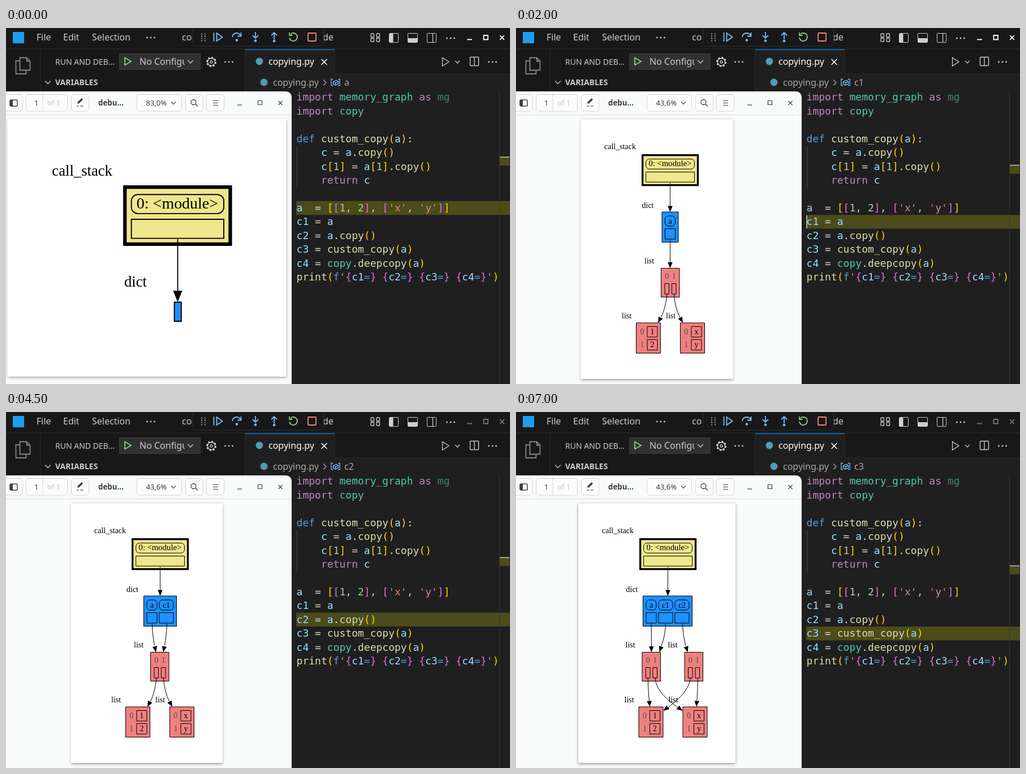
An HTML page with a canvas for the animation above (8000 ms loop, 891 by 629 pixels).

```html
<!DOCTYPE html>
<html lang="en">
<head>
<meta charset="utf-8">
<title>Stepping through list copies</title>
<style>
html, body { margin: 0; width: 100%; height: 100%; overflow: hidden; background: #1f1f1f; }
canvas { display: block; }
</style>
</head>
<body>
<canvas id="stage" width="891" height="629"></canvas>
<script>
const ctx = document.getElementById('stage').getContext('2d');
const UI = '"Noto Sans", "Open Sans", sans-serif';
const MONO = '"DejaVu Sans Mono", monospace';
const SERIF = '"Liberation Serif", "Times New Roman", serif';

// ---------- drawing helpers ----------
function rect(x, y, w, h, fill, stroke, radius = 0, width = 1) {
  ctx.beginPath();
  ctx.roundRect(x, y, w, h, radius);
  if (fill) { ctx.fillStyle = fill; ctx.fill(); }
  if (stroke) { ctx.strokeStyle = stroke; ctx.lineWidth = width; ctx.stroke(); }
}

function path(d, stroke, width = 1.3, fill) {
  const p = new Path2D(d);
  if (fill) { ctx.fillStyle = fill; ctx.fill(p); }
  if (stroke) { ctx.strokeStyle = stroke; ctx.lineWidth = width; ctx.stroke(p); }
}

function text(s, x, y, color, font, align = 'left') {
  ctx.font = font;
  ctx.fillStyle = color;
  ctx.textAlign = align;
  ctx.fillText(s, x, y);
}

function disc(x, y, r, color) {
  ctx.beginPath();
  ctx.arc(x, y, r, 0, 7);
  ctx.fillStyle = color;
  ctx.fill();
}

const dots = (x, y, color = '#ccc') => [-6.5, 0, 6.5].forEach(d => disc(x + d, y, 1.4, color));
const chevron = (x, y, color, r = 4.5) => path(`M${x - r} ${y - r / 2}l${r} ${r}l${r} ${-r}`, color);
const cross = (x, y, r, color, width) =>
  path(`M${x - r} ${y - r}l${2 * r} ${2 * r}m0 ${-2 * r}l${-2 * r} ${2 * r}`, color, width);

// ---------- editor ----------
const COLORS = {
  k: '#c586c0', d: '#569cd6', t: '#4ec9b0', m: '#3e8577', v: '#9cdcfe', f: '#dcdcaa',
  n: '#b5cea8', s: '#ce9178', w: '#d4d4d4', g: '#ffd700', o: '#da70d6'
};

// Tokens are split by "|"; the first letter of each picks its colour.
const field = name => `o{|v${name}|d=|o}`;
const CODE = [
  'kimport |tmemory_graph|k as |mmg',
  'kimport |tcopy',
  '',
  'ddef |fcustom_copy|g(|va|g)|w:',
  'w    |vc|w = |va|w.|fcopy|g()',
  'w    |vc|g[|n1|g]|w = |va|g[|n1|g]|w.|fcopy|g()',
  'w    |kreturn |vc',
  '',
  "va|w  = |g[|o[|n1|w, |n2|o]|w, |o[|s'x'|w, |s'y'|o]|g]",
  'vc1|w = |va',
  'vc2|w = |va|w.|fcopy|g()',
  'vc3|w = |fcustom_copy|g(|va|g)',
  'vc4|w = |tcopy|w.|fdeepcopy|g(|va|g)',
  `fprint|g(|df|s'|${['c1', 'c2', 'c3', 'c4'].map(field).join('|w |')}|s'|g)`
];
const LINE = 24.46, CHAR = 10.837;

function drawCode(step) {
  rect(513, 305.7 + step * LINE, 378, LINE, '#4b4b1c');
  rect(514, 208, 1, 74, '#484848');
  CODE.forEach((line, row) => {
    let col = 0;
    for (const token of line.split('|')) {
      const s = token.slice(1);
      text(s, 513.6 + col * CHAR, 128.2 + row * LINE, COLORS[token[0]], '18px ' + MONO);
      col += s.length;
    }
  });
  if (step === 1) rect(513, 331, 2, 23, '#aeafad');

  rect(872, 110, 1, 519, '#343434');
  const mark = 227 + step * 14.6;
  rect(873, mark, 17, 16, '#4d4b18');
  rect(873, mark, 17, 2, '#a0a0a0');
}

function drawTopBar(active) {
  const c = '#cccccc', icon = '#d0d0d0';
  rect(0, 0, 891, 37, '#181818');
  rect(0, 36.5, 891, 1, '#2b2b2b');
  rect(12, 7, 20, 20, '#1f9cf0');
  [['File', 54], ['Edit', 101], ['Selection', 152]].forEach(([s, x]) => text(s, x, 22, c, '16px ' + UI));
  dots(256, 17);
  text('co', 311, 22, c, '16px ' + UI);
  text('de', 560, 22, c, '16px ' + UI);

  // floating debug controls
  rect(330.5, -6, 231, 38, '#181818', '#303030', 5);
  for (let i = 0; i < 8; i++) disc(346 + (i % 2) * 6, 10.5 + (i >> 1) * 4, 1.2, '#888');
  const blue = '#75beff';
  path('M367.5 8v16M372.5 9v14l10-7z', blue, 1.8);
  path('M400 16q1-7 8-7q5 0 7 5M415.500 8v6.500h-6.500', blue, 1.8);
  disc(408, 21.5, 2.3, blue);
  path('M441 7v11M436 13l5 5l5-5', blue, 1.8);
  disc(441, 22.5, 2.3, blue);
  path('M474 20V8M469 13l5-5l5 5', blue, 1.8);
  disc(474, 23, 2.3, blue);
  path('M503 11a7 7 0 1 1-2 6M501 8v5h5.500', '#89d185', 1.8);
  rect(534, 9, 14, 14, null, '#f48771', 1, 1.8);

  // layout buttons
  [[645, 10], [645, 18], [655, 10], [655, 18]].forEach(([x, y]) => rect(x, y, 5.5, 6, null, icon, 1, 1.3));
  rect(677.5, 9.5, 16, 16, null, icon, 1);
  rect(678, 10, 6.5, 15, icon);
  rect(710.5, 9.5, 17, 16, null, icon, 1);
  rect(711, 18, 16, 7, icon);
  rect(744.5, 9.5, 16, 16, null, icon, 1);
  path('M754.500 9.500v16', icon);
  dots(786, 18);

  const win = active ? '#ffffff' : '#777777';
  rect(815, 19.5, 9, 1.8, win);
  rect(844.5, 13, 7.5, 7.5, null, win, 0, 1.8);
  cross(877, 17, 3.8, win, 1.7);
}

function drawPanels(name) {
  const c = '#cccccc';
  rect(0, 37.5, 422, 592, '#181818');
  rect(422, 37.5, 469, 44, '#181818');
  rect(60, 38, 1, 80, '#2b2b2b');
  rect(422, 38, 1, 80, '#2b2b2b');
  path('M24 58h-6.500v23h18v-6M24.500 52.500h12l6 6v16h-18zM36.500 52.500v6h6', '#868686', 1.8);

  text('RUN AND DEB…', 87, 64.5, c, '14px ' + UI);
  rect(200.5, 45.5, 143, 28, '#313131', '#3c3c3c');
  path('M210 52.500v13l11-6.500z', '#89d185', 1.8);
  ctx.save();
  ctx.beginPath();
  ctx.rect(230, 45, 86, 28);
  ctx.clip();
  text('No Configurations', 236, 64.5, c, '16px ' + UI);
  ctx.restore();
  chevron(326, 59.5, c, 5);
  ctx.setLineDash([3.3, 2.58]);
  ctx.beginPath();
  ctx.arc(363, 60, 7.5, 0, 2 * Math.PI);
  ctx.lineWidth = 3;
  ctx.strokeStyle = c;
  ctx.stroke();
  ctx.setLineDash([]);
  path('M369.500 60a6.500 6.500 0 1 1-13 0a6.500 6.500 0 1 1 13 0M365 60a2 2 0 1 1-4 0a2 2 0 1 1 4 0', c, 1.3);
  dots(394, 60);
  chevron(74, 96, c, 5);
  text('VARIABLES', 87, 101, c, 'bold 14px ' + UI);

  // tab and breadcrumb
  rect(581, 80.5, 310, 1, '#2b2b2b');
  rect(423, 38, 158, 44, '#1f1f1f');
  rect(580.5, 38, 1, 43, '#2b2b2b');
  rect(423, 37, 158, 2, '#0078d4');
  disc(448, 59, 6.5, '#519aba');
  text('copying.py', 464, 64.5, '#ffffff', '16px ' + UI);
  cross(562.5, 60, 5, '#ffffff', 1.6);
  path('M771.500 52.500v14.500l11.500-7.250z', c);
  chevron(798, 60, c, 4);
  rect(820.5, 51.5, 15, 15, null, c, 1, 1.4);
  path('M828 51.500v15', c);
  dots(860, 60);
  disc(456, 96, 6.5, '#519aba');
  text('copying.py', 472, 102, '#a9a9a9', '16px ' + UI);
  path('M561 91.500l5 5l-5 5', '#a9a9a9');
  path('M578 90.500h-3v11h3M587 90.500h3v11h-3M578.500 95l5-2.500l4 2v4l-5 2.500l-4-2zl4 2l5-2.500m-5 2.500v4', '#75beff', 1.3);
  text(name, 598, 102, '#a9a9a9', '16px ' + UI);
}

// ---------- graph viewer ----------
function drawViewer(zoom, [x, y, w, h]) {
  const ink = '#3d3d3d', border = '#d4d4d4';
  rect(-12, 112, 517, 530, '#f9fbfa', null, 10);
  rect(0, 153, 505, 1, '#dadada');
  rect(-9.5, 117.5, 38.5, 29.5, '#fcfcfc', border, 5);
  rect(7, 127, 13, 11, null, ink, 2, 1.5);
  rect(7, 127, 5, 11, ink);
  rect(35.5, 117.5, 73, 29.5, '#fcfcfc', border, 5);
  rect(64.5, 118, 1, 29, border);
  text('1', 50, 137, ink, '13px ' + UI);
  text('of 1', 73, 137, '#c4c4c4', '13px ' + UI);
  rect(115.5, 117.5, 31, 29.5, '#fcfcfc', border, 5);
  path('M126 134l1-3.500l6.500-6.500l2.500 2.500l-6.500 6.500z', null, 1, ink);
  path('M125 138h4M131 138h6', ink, 1.2);
  text('debu…', 163, 137, ink, 'bold 13.3px ' + UI);
  rect(231.5, 117.5, 79, 29.5, '#fcfcfc', border, 5);
  text(zoom, 247.5, 137, ink, '13px ' + UI);
  chevron(296, 132.5, '#555', 4);
  rect(317.5, 117.5, 31, 29.5, '#fcfcfc', border, 5);
  path('M336 131a4.500 4.500 0 1 1-9 0a4.500 4.500 0 1 1 9 0M335 134.500l4 4', ink);
  rect(354.5, 117.5, 31, 29.5, '#fcfcfc', border, 5);
  path('M366 128.500h9M366 132.500h9M366 136.500h9', ink, 1.2);
  path('M409 136h8', ink, 1.2);
  rect(445.5, 128.5, 7, 7, null, ink, 0, 1.2);
  cross(485, 132.5, 3.5, ink, 1.2);

  ctx.save();
  ctx.shadowColor = 'rgba(0,0,0,.38)';
  ctx.shadowBlur = 5;
  ctx.shadowOffsetY = 1.5;
  rect(x, y, w, h, '#fefefe');
  ctx.restore();
}

const label = (s, x, y) => text(s, x, y, '#000', '14px ' + SERIF);
const centered = (s, x, y, color = '#000', size = 14) => text(s, x, y, color, `${size}px ${SERIF}`, 'center');

// Cubic edge with a filled arrow head; without controls it is straight.
function edge(x0, y0, x1, y1, c = [x0, y0, x0, y0]) {
  const a = Math.atan2(y1 - c[3], x1 - c[2]), cos = Math.cos(a), sin = Math.sin(a);
  const bx = x1 - 10.5 * cos, by = y1 - 10.5 * sin;
  path(`M${x0} ${y0}C${c} ${bx} ${by}`, '#000', 1);
  path(`M${x1} ${y1}L${bx - 4.2 * sin} ${by + 4.2 * cos}L${bx + 4.2 * sin} ${by - 4.2 * cos}z`, null, 1, '#000');
}

function moduleNode(x) {
  rect(x + 1.7, 224.6, 97.8, 53, '#f0e68c', '#000', 0, 3.3);
  rect(x + 7.7, 231.5, 85.8, 17.7, null, '#000', 6);
  rect(x + 7.7, 254.5, 85.8, 17.7, null, '#000');
  centered('0: <module>', x + 50.4, 244.3, '#000', 14.7);
  label('call_stack', x - 66, 214.3);
}

function dictNode(x, keys) {
  const widths = keys.map(k => k === 'a' ? 18 : 25);
  rect(x, 325, widths.reduce((sum, w) => sum + w + 4, 7), 53.5, '#1e90ff', '#000');
  let left = x + 5.5;
  keys.forEach((key, i) => {
    rect(left, 332, widths[i], 18, null, '#000', 6);
    rect(left, 354.5, widths[i], 18.5, null, '#000');
    centered(key, left + widths[i] / 2, 346);
    left += widths[i] + 4;
  });
}

function listNode(x) {
  rect(x, 424.5, 32.5, 51, '#f08080', '#000');
  [0, 1].forEach(i => {
    centered(i, x + 10.3 + i * 12.5, 443, '#505050');
    rect(x + 6.5 + i * 12.5, 451.5, 7.5, 18.5, null, '#000');
  });
}

function leafNode(x, values) {
  rect(x, 521, 43, 53.5, '#f08080', '#000');
  values.forEach((v, i) => {
    const y = 527.5 + i * 23;
    centered(i, x + 10.5, y + 13.5, '#505050');
    rect(x + 19.5, y, 18, 18.5, null, '#000');
    centered(v, x + 28.5, y + 13.5);
  });
}

function leaves(x) {
  leafNode(x, [1, 2]);
  leafNode(x + 78, ['x', 'y']);
  label('list', x - 25.5, 513);
  label('list', x + 52.5, 513);
}

// One list node pointing at both leaves.
function singleTree(x) {
  listNode(x);
  label('list', x - 29.5, 416);
  leaves(x - 44);
  edge(x + 10.3, 470, x - 5.5, 521, [x + 9, 486, x + 5, 501, x, 511]);
  edge(x + 22.8, 470, x + 38.5, 521, [x + 24, 486, x + 28, 501, x + 33, 511]);
}

const GRAPHS = [
  () => {
    ctx.translate(-215.7, -146.6);
    ctx.scale(1.904, 1.904);
    moduleNode(222);
    label('dict', 223, 317);
    rect(269.6, 331.5, 6.4, 17.7, '#1e90ff', '#000');
    edge(272.7, 273, 272.7, 331.3);
  },
  () => {
    moduleNode(222);
    label('dict', 222.5, 317.5);
    dictNode(258, ['a']);
    edge(272.5, 273, 272.5, 325);
    singleTree(256.5);
    edge(272.5, 374, 272.5, 424.5);
  },
  () => {
    moduleNode(222);
    label('dict', 213, 317.5);
    dictNode(243.5, ['a', 'c1']);
    edge(272.5, 273, 272.5, 325);
    singleTree(255.5);
    edge(258.3, 374, 265, 424.5, [258.5, 388, 260.5, 401, 262.5, 412]);
    edge(284.5, 374, 278, 424.5, [284, 388, 282.5, 401, 280.5, 412]);
  },
  () => {
    moduleNode(218);
    label('dict', 194.5, 317.5);
    dictNode(224.5, ['a', 'c1', 'c2']);
    edge(268.5, 273, 268.5, 325);
    listNode(223);
    listNode(298);
    label('list', 193.5, 416);
    label('list', 268.5, 416);
    leaves(217);
    edge(239.2, 374, 239.4, 424.5);
    edge(264.5, 374, 253.5, 424.5, [264, 389, 261, 402, 257, 414]);
    edge(294.5, 374, 303.5, 424.5, [295, 389, 297, 401, 300, 413]);
    edge(233.3, 470, 236.5, 521, [233.5, 485, 234.5, 500, 235.5, 510]);
    edge(246, 470, 294.8, 528, [248, 494, 269, 509, 286, 522]);
    edge(308.5, 470, 260.2, 528, [305, 494, 284, 510, 269, 522]);
    edge(321.3, 470, 319, 521, [321.5, 485, 320.5, 500, 319.8, 510]);
  }
];

// ---------- timeline ----------
const STEPS = [
  { start: 0, name: 'a', zoom: '83,0%', page: [2.5, 161, 493, 455] },
  { start: 500, name: 'c1', zoom: '43,6%', page: [114.5, 161.5, 269.5, 458.5] },
  { start: 3000, name: 'c2', zoom: '43,6%', page: [114.5, 161.5, 268.5, 458.5] },
  { start: 5500, name: 'c3', zoom: '43,6%', page: [110, 161.5, 278, 458.5] }
];

function draw() {
  const time = performance.now() % 8000;
  const index = STEPS.findLastIndex(s => time >= s.start);
  const { name, zoom, page } = STEPS[index];
  rect(0, 0, 891, 629, '#1f1f1f');
  drawPanels(name);
  drawTopBar(index < 2);
  drawCode(index);
  drawViewer(zoom, page);
  ctx.save();
  GRAPHS[index]();
  ctx.restore();
  requestAnimationFrame(draw);
}
draw();
</script>
</body>
</html>
```
